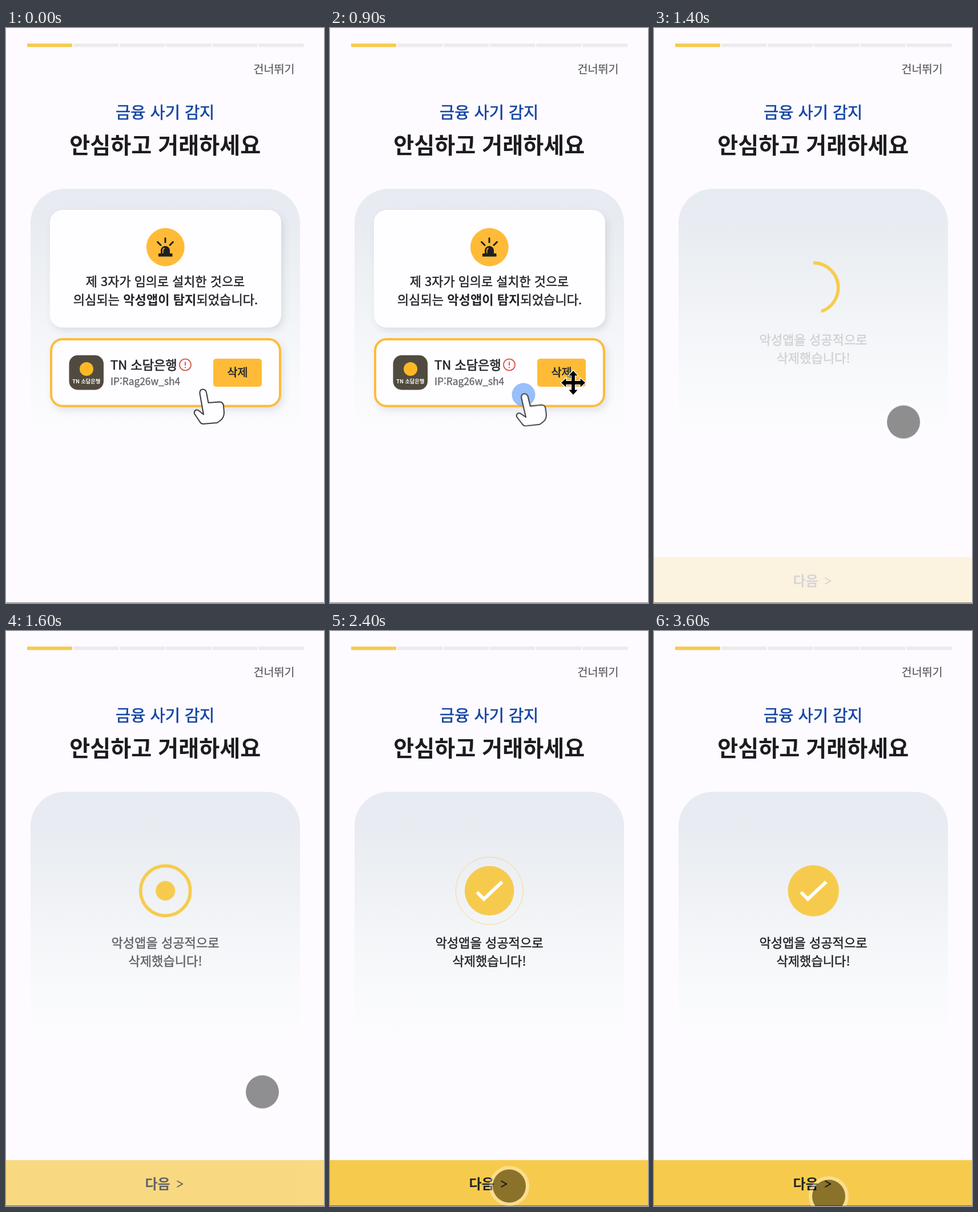
Animation of 557 by 1005 pixels, one loop 3700 ms. Source, as an HTML page:

```html
<!DOCTYPE html>
<html lang="ko">
<head>
<meta charset="utf-8">
<title>금융 사기 감지</title>
<style>
html, body { margin: 0; width: 100%; height: 100%; overflow: hidden; background: #fdfbff; }
svg { display: block; width: 100vw; height: 100vh; }
/* The thin stroke gives the regular face a medium weight */
text {
  font-family: "Noto Sans CJK KR", "Noto Sans CJK", sans-serif;
  color: #222326; fill: currentColor; stroke: currentColor; stroke-width: .022em;
}
.mid { text-anchor: middle; }
.bold { font-weight: 700; stroke: none; }
.copy { font-size: 22.1px; }

/* 1% = 37 ms */
.anim { animation: 3700ms linear infinite; transform-box: view-box; }
#warning { animation-name: warning; animation-timing-function: step-end; }
#mover { animation-name: mover; animation-timing-function: step-end; }
#hand { animation-name: press; animation-timing-function: ease-in-out; transform-origin: 356px 691px; }
#tap { animation-name: tap; transform-origin: 339px 641px; }
#done, #next { animation-name: appear; }
#arc { animation-name: arc; }
#disc { animation-name: disc; transform-origin: 279.2px 454px; }
#tick { animation-name: tick; animation-timing-function: ease-out; }
#ring { animation-name: ring; }
#touch { animation-name: touch; }

@keyframes warning { 0% { visibility: visible; } 35.1%, 100% { visibility: hidden; } }
@keyframes mover { 0% { visibility: hidden; } 18.9% { visibility: visible; } 35.1%, 100% { visibility: hidden; } }
@keyframes press {
  0%, 8.1% { transform: none; }
  16.2%, 100% { transform: translate(-2.5px, 3.3px) rotate(-2deg) scaleY(.93); }
}
@keyframes tap {
  0%, 13.5% { opacity: 0; transform: scale(.3); }
  18.9%, 100% { opacity: 1; transform: none; }
}
@keyframes appear {
  0%, 35.135% { opacity: 0; }
  37.838% { opacity: .17; }
  40.54% { opacity: .45; }
  43.243% { opacity: .7; }
  45.946% { opacity: .86; }
  48.649% { opacity: .95; }
  51.351%, 100% { opacity: 1; }
}
@keyframes arc {
  0%, 35.135% { stroke-dashoffset: 100; opacity: 0; }
  35.2% { opacity: 1; }
  37.838% { stroke-dashoffset: 55.5; }
  41.5%, 50% { stroke-dashoffset: 0; opacity: 1; }
  50.1%, 100% { stroke-dashoffset: 0; opacity: 0; }
}
@keyframes disc {
  0%, 41.5% { transform: scale(0); }
  46% { transform: scale(1); }
  48.649% { transform: scale(1.109); }
  54.054%, 94.6% { transform: scale(1); }
  97.297% { transform: scale(1.032); }
  100% { transform: scale(1.08); }
}
@keyframes tick {
  0%, 49.5% { stroke-dashoffset: 101; opacity: 0; }
  49.6% { opacity: 1; }
  58%, 100% { stroke-dashoffset: 0; opacity: 1; }
}
@keyframes ring {
  0%, 54% { r: 43px; stroke-width: 6px; opacity: 0; }
  54.1% { opacity: 1; }
  64.865% { r: 59px; stroke-width: 1px; opacity: .65; }
  68%, 100% { r: 60px; stroke-width: .1px; opacity: 0; }
}
@keyframes touch {
  0%, 35.09% { transform: translate(428px, 630px); visibility: hidden; }
  35.1% { transform: translate(428px, 630px); visibility: visible; }
  37.838% { transform: translate(437px, 688px); }
  43.243% { transform: translate(449px, 805px); }
  48.649% { transform: translate(449px, 898px); }
  54.054% { transform: translate(415px, 945px); }
  59.459% { transform: translate(345px, 966px); }
  64.865% { transform: translate(314px, 970px); }
  81.081% { transform: translate(312px, 976px); }
  97.297% { transform: translate(306px, 988px); }
  100% { transform: translate(305px, 990px); visibility: visible; }
}
</style>
</head>
<body>
<svg viewBox="0 0 557 1005" preserveAspectRatio="none">
  <defs>
    <linearGradient id="fade" x1="0" y1="0" x2="0" y2="1">
      <stop offset="0" stop-color="#e7ebf2"/>
      <stop offset=".14" stop-color="#e8ebf1"/>
      <stop offset=".25" stop-color="#ebeef2"/>
      <stop offset=".55" stop-color="#f3f5f8"/>
      <stop offset=".8" stop-color="#f9fafc"/>
      <stop offset="1" stop-color="#fdfbff"/>
    </linearGradient>
    <filter id="shadow" x="-10%" y="-20%" width="120%" height="150%">
      <feDropShadow dx="4" dy="6" stdDeviation="6" flood-color="#50586a" flood-opacity=".15"/>
    </filter>
  </defs>
  <rect width="557" height="1005" fill="#fdfbff"/>

  <!-- Progress and headings -->
  <path d="M37 30.2H521.6" stroke="#ebebed" stroke-width="6" stroke-dasharray="79 2.1"/>
  <path d="M37 30.2h79" stroke="#f7cb4d" stroke-width="6"/>
  <text x="469.5" y="79" class="mid" font-size="19.6" style="color:#58595c;stroke-width:.01em">건너뛰기</text>
  <text x="278.7" y="158" class="mid" font-size="28.5" style="color:#1244a2">금융 사기 감지</text>
  <text x="278.7" y="218.5" class="mid bold" font-size="39.15" style="color:#1c1c1f">안심하고 거래하세요</text>
  <path d="M43 720V341a60 60 0 0 1 60-60H455a60 60 0 0 1 60 60V720Z" fill="url(#fade)"/>

  <!-- Warning screen -->
  <g id="warning" class="anim">
    <rect x="77" y="318" width="405" height="205.5" rx="22" fill="#fefdff" filter="url(#shadow)"/>
    <circle cx="279.3" cy="383" r="33.4" fill="#ffbb37"/>
    <g fill="#202022" stroke="#202022" stroke-linecap="round" stroke-width="3">
      <path d="M279 367.5v7M265.5 374l5.5 5.5M292.5 374l-5.5 5.5"/>
      <path d="M271 394v-5a8 8 0 0 1 16 0v5h3.5q1 0 1 1v4.5H267v-4.5q0-1 1-1Z" stroke="none"/>
      <path d="M274.7 393v-4q0-3 2.5-4" fill="none" stroke="#ffbb37" stroke-width="1.5"/>
    </g>
    <text x="279" y="451" class="mid" font-size="21.9">제 3자가 임의로 설치한 것으로</text>
    <text x="279.5" y="483" class="mid copy">의심되는 <tspan class="bold">악성앱이 탐지</tspan>되었습니다.</text>

    <rect x="79" y="544" width="401" height="116.8" rx="20" fill="#fefdff" stroke="#ffbb37" stroke-width="4" filter="url(#shadow)"/>
    <rect x="110.5" y="572" width="60.5" height="60.5" rx="15" fill="#514b3f"/>
    <circle cx="141" cy="596" r="12" fill="#ffb825"/>
    <text x="140.7" y="621" class="mid bold" font-size="9.2" style="color:#fff">TN 소담은행</text>
    <text x="183" y="597" font-size="22.1" style="stroke-width:.028em">TN 소담은행</text>
    <circle cx="314" cy="588.5" r="10" fill="none" stroke="#d64533" stroke-width="1.6"/>
    <path d="M314 583.5v6.5M314 592.2v2" stroke="#d64533" stroke-width="1.8"/>
    <text x="183" y="623.5" font-size="17.3" style="color:#68696d">IP:Rag26w_sh4</text>
    <rect x="363" y="578" width="85" height="49" rx="5" fill="#ffbb37"/>
    <text x="405.5" y="608.5" class="mid" font-size="19.7" style="stroke-width:.028em">삭제</text>

    <circle id="tap" class="anim" cx="339" cy="641" r="20" fill="#6ea4fa" fill-opacity=".7" stroke="#78a4ec" stroke-opacity=".6"/>
    <path id="hand" class="anim" fill="#fefdff" stroke="#3b3c40" stroke-width="2" stroke-linejoin="round"
      d="M346 675.5L339.5 639Q339 632.5 344 631.5Q349.5 631 351 637L354.5 655L374 653.5Q380 653.5 381 660L382 672Q382 681 376 685.5L370 690L345 692Q341 691.5 339 687.5L330 674Q329 669 333 667.5Q336 667 338 669Z"/>
  </g>
  <path id="mover" class="anim" transform="translate(426 620)" fill="#000" stroke="#fff" stroke-width="1.2"
    d="M0-22 9-12H3.5V-3.5H12V-9L22 0 12 9V3.5H3.5V12H9L0 22-9 12H-3.5V3.5H-12V9L-22 0-12-9V-3.5H-3.5V-12H-9Z"/>

  <!-- Success screen -->
  <g fill="none" stroke="#f6cb4d">
    <circle id="ring" class="anim" cx="279.2" cy="454" r="43"/>
    <circle id="arc" class="anim" cx="279.2" cy="454" r="43.5" stroke-width="5.6" pathLength="100" stroke-dasharray="100" transform="rotate(-90 279.2 454)"/>
    <circle id="disc" class="anim" cx="279.2" cy="454" r="43.3" fill="#f6cb4d" stroke="none"/>
    <path id="tick" class="anim" d="M257.5 456.5L269.5 468.5L301.5 438.5" stroke="#fff" stroke-width="6" pathLength="100" stroke-dasharray="101"/>
  </g>
  <g id="done" class="anim">
    <text x="279" y="553" class="mid copy">악성앱을 성공적으로</text>
    <text x="279" y="584.5" class="mid copy">삭제했습니다!</text>
  </g>
  <g id="next" class="anim">
    <rect y="924.7" width="557" height="80.3" fill="#f6cb4d"/>
    <text x="243.5" y="975" class="bold" font-size="24">다음</text>
    <path d="M299.5 961L309 966.5L299.5 972" fill="none" stroke="#222326" stroke-width="2"/>
  </g>
  <path d="M0 1004.5H557" stroke="#000" stroke-opacity=".5"/>
  <g id="touch" class="anim">
    <circle r="32" fill="none" stroke="#fff" stroke-opacity=".36" stroke-width="6"/>
    <circle r="29" fill="#000" fill-opacity=".435"/>
  </g>
</svg>
</body>
</html>
```
